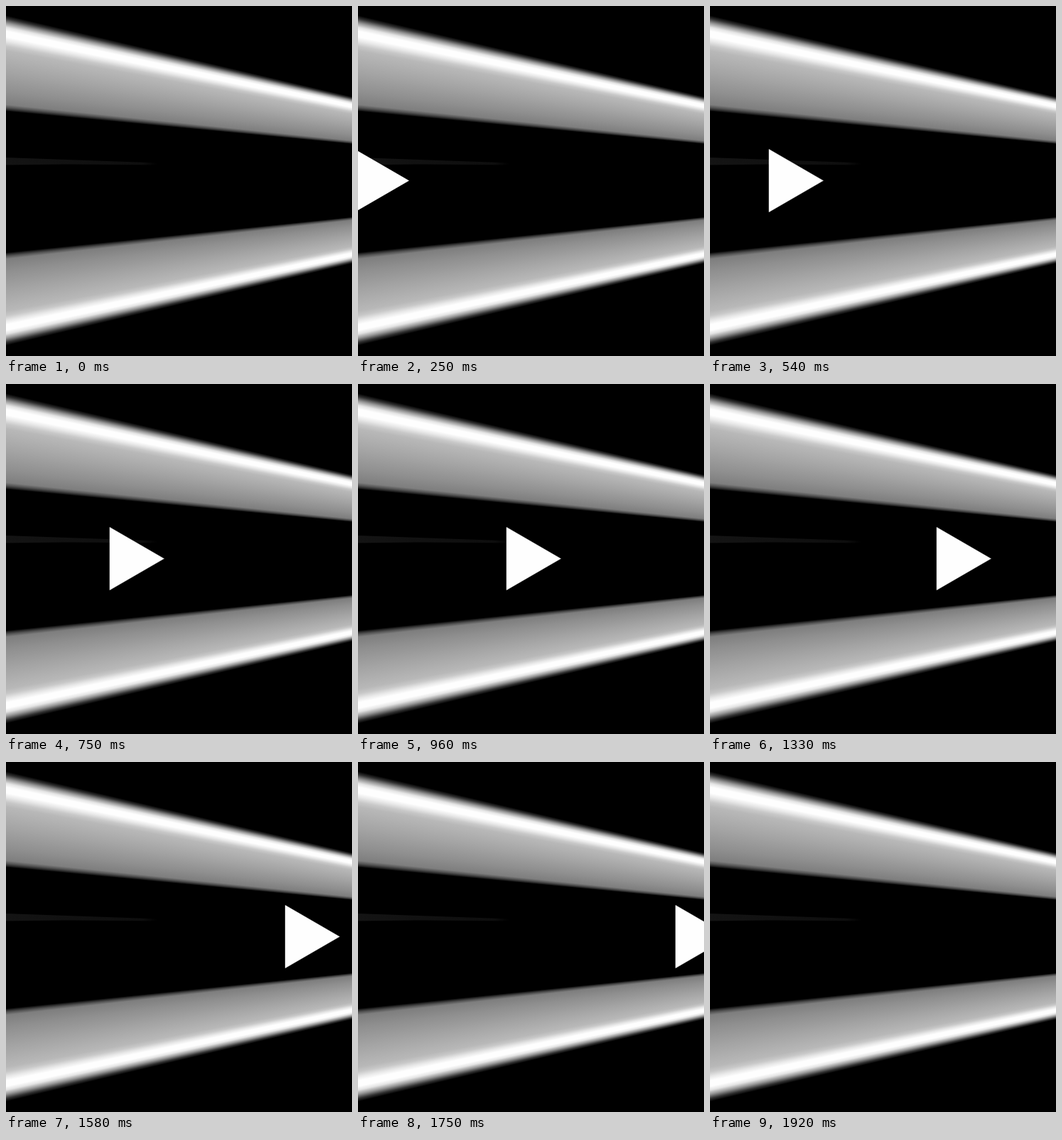
Write an HTML page with a canvas that moves like this. It is 487x492 px and loops after 1960 ms.

```html
<!DOCTYPE html>
<html lang="en">
<head>
<meta charset="utf-8">
<title>Arrow between beams</title>
<style>
  html, body { margin: 0; width: 100%; height: 100%; overflow: hidden; background: #000; }
  .stage { position: relative; width: 487px; height: 492px; overflow: hidden; background: #000; }
  canvas { position: absolute; left: 0; top: 0; }
  .arrow {
    position: absolute; left: 0; top: 201px; width: 77px; height: 89px;
    background: #fefefe;
    clip-path: polygon(0 0, 100% 50%, 0 100%);
    animation: fly 1960ms -7ms infinite;
  }
  /* 47 poses per loop, moved in hard steps at 24 per second */
  @keyframes fly {
    0%       { transform: translateX(-79px);   animation-timing-function: steps(6); }
    12.766%  { transform: translateX(-5px);    animation-timing-function: steps(7); }
    27.6596% { transform: translateX(82.7px);  animation-timing-function: steps(10); }
    48.9362% { transform: translateX(208.8px); animation-timing-function: steps(3); }
    55.3191% { transform: translateX(248.7px); animation-timing-function: steps(6); }
    68.0851% { transform: translateX(318.8px); animation-timing-function: steps(6); }
    80.8511% { transform: translateX(392.8px); animation-timing-function: steps(1); }
    82.9787% { transform: translateX(409px);   animation-timing-function: steps(7); }
    97.8723%, 100% { transform: translateX(497px); }
  }
</style>
</head>
<body>
<div class="stage">
  <canvas id="beams" width="487" height="492"></canvas>
  <div class="arrow"></div>
</div>
<script>
  const canvas = document.getElementById('beams');
  const ctx = canvas.getContext('2d');
  const W = canvas.width;

  // Grey levels across a beam, from its outer to its inner edge
  const shades = [
    [0, 0], [0.035, 50], [0.08, 150], [0.125, 228], [0.165, 254], [0.225, 254],
    [0.27, 232], [0.32, 200], [0.37, 184], [0.6, 163], [0.8, 143],
    [0.93, 126], [0.96, 84], [0.98, 46], [1, 0]
  ];
  const grey = v => `rgb(${v},${v},${v})`;
  const mix = (a, b, t) => a + (b - a) * t;

  // Edges are [y at the left, y at the right]
  function beam(outer, inner) {
    for (let x = 0; x < W; x++) {
      const t = (x + 0.5) / W;
      const from = mix(...outer, t), to = mix(...inner, t);
      const fill = ctx.createLinearGradient(0, from, 0, to);
      for (const [at, v] of shades) fill.addColorStop(at, grey(v));
      ctx.fillStyle = fill;
      ctx.fillRect(x, Math.min(from, to), 1, Math.abs(to - from));
    }
  }

  function streak() {
    const fill = ctx.createLinearGradient(0, 0, 213, 0);
    fill.addColorStop(0, grey(20));
    fill.addColorStop(0.45, grey(17));
    fill.addColorStop(0.9, grey(14));
    fill.addColorStop(1, grey(0));
    ctx.fillStyle = fill;
    ctx.beginPath();
    ctx.moveTo(0, 213);
    ctx.lineTo(213, 220.5);
    ctx.lineTo(213, 223.5);
    ctx.lineTo(85, 222.5);
    ctx.lineTo(0, 223.5);
    ctx.fill();
  }

  beam([13, 127.5], [148, 194]);
  beam([477.5, 362], [346.5, 296.5]);
  streak();
</script>
</body>
</html>
```
